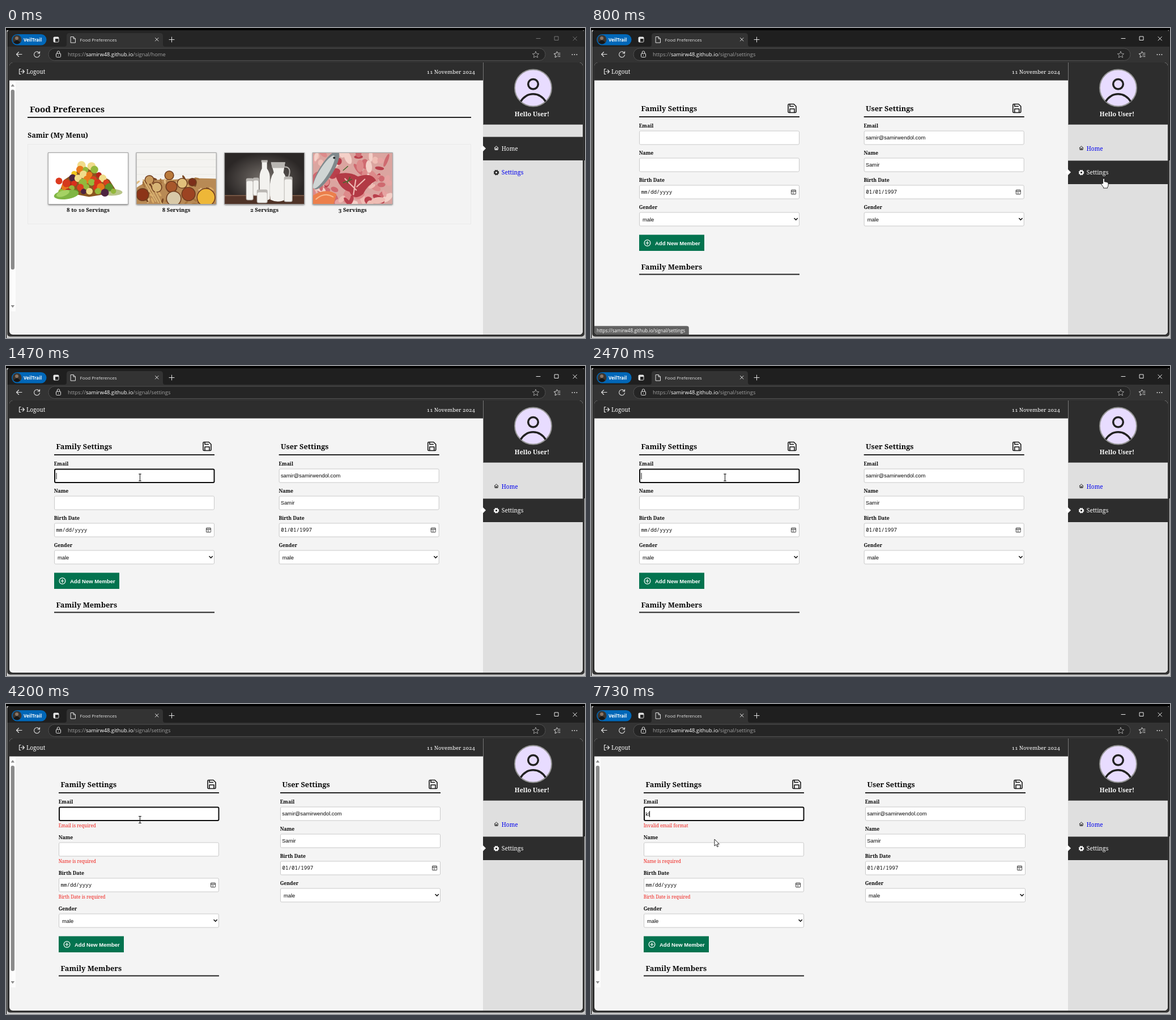
These frames come from a looping animation (1022x548 px, 8000 ms). An HTML page:

```html
<!DOCTYPE html>
<html lang="en">
<head>
<meta charset="utf-8">
<title>Food Preferences</title>
<style>
  html, body { margin: 0; width: 100%; height: 100%; overflow: hidden; background: #000; }
  svg { display: block; }
  .slab { font-family: "Noto Serif", serif; font-variant-numeric: oldstyle-nums; }
  .ui { font-family: "Open Sans", "Noto Sans", sans-serif; }
  .form { font-family: "Liberation Sans", Arial, sans-serif; font-size: 9.4px; }
  .mono { font-family: "Noto Sans Mono", "Liberation Mono", monospace; font-size: 9.15px; }
  .b { font-weight: 700; }
  .m { font-weight: 500; }
  .err { font-size: 8px; }
  .label { font-size: 8.7px; }
  .line { fill: none; stroke-linecap: round; stroke-linejoin: round; }
</style>
</head>
<body>
<svg id="stage" width="1022" height="548" viewBox="0 0 1022 548"></svg>
<script>
const LOOP = 8000, FPS = 15;
const DARK = '#2d2d2d', INK = '#080808';
const NAME = 'Samir', MAIL = 'samir@samirwendol.com', HOST = 'samirw48.github.io';

const rect = (x, y, w, h, fill, extra = '') =>
  `<rect x="${x}" y="${y}" width="${w}" height="${h}" fill="${fill}" ${extra}/>`;
const circle = (x, y, r, fill, extra = '') =>
  `<circle cx="${x}" cy="${y}" r="${r}" fill="${fill}" ${extra}/>`;
const ellipse = (x, y, rx, ry, fill, turn = 0) =>
  `<ellipse cx="${x}" cy="${y}" rx="${rx}" ry="${ry}" fill="${fill}" transform="rotate(${turn} ${x} ${y})"/>`;
const line = (d, color, width = 1, extra = '') =>
  `<path class="line" d="${d}" stroke="${color}" stroke-width="${width}" ${extra}/>`;
const shape = (d, fill, extra = '') => `<path d="${d}" fill="${fill}" ${extra}/>`;
const text = (x, y, str, cls, size, fill = INK, extra = '') =>
  `<text x="${x}" y="${y}" class="${cls}" ${size ? `font-size="${size}"` : ''} fill="${fill}" ${extra}>${str}</text>`;
const group = (id, body) => `<g id="${id}">${body}</g>`;
const at = (x, y, body) => `<g transform="translate(${x} ${y})">${body}</g>`;

function seeded(seed) {
  return () => (seed = (seed * 16807) % 2147483647) / 2147483647;
}

// ---- browser window over a light one behind it ----
function chrome() {
  const pale = '#e4e4e4';
  return rect(1, 4, 1021, 544, '#c9c9c9') + rect(1020, 4, 2, 230, '#1c1c1c') +
    rect(2, 4, 1019, 541.5, '#333', 'rx="5"') +
    shape('M2 33V9Q2 4 7 4H1016Q1021 4 1021 9V33Z', '#1f1f1f', 'id="titlebar"') +
    shape('M103 33Q107 33 107 29V14Q107 9 112 9H272Q277 9 277 14V29Q277 33 281 33Z', '#333') +
    rect(10, 11, 61.5, 19.5, '#0067b8', 'rx="9.7"') +
    circle(19.5, 20.5, 8, '#3b3530') + circle(19, 18, 3, '#8b7565') +
    shape('M13.5 25.5Q19 18 25 25.5Q19.5 31 13.5 25.5Z', '#161616') +
    text(31, 23.6, 'VeilTrail', 'ui b', 8, '#fff') +
    rect(84, 16, 9, 9, 'none', `stroke="${pale}" rx="1.5"`) + rect(84, 16, 9, 3, pale) + rect(84, 16, 3, 9, pale) +
    line('M114.5 15.5H119L122.5 19V26H114.5ZM119 15.5V19H122.5', pale) +
    text(130.5, 23.5, 'Food Preferences', 'ui', 8, pale) +
    line('M263.5 17.5L269 23M269 17.5L263.5 23', pale) +
    line('M288 20.5H297M292.5 16V25', pale) +
    group('caption', line('M936 18.5H943M968.5 15H975V21.5H968.5ZM1001 15.5L1007.5 22M1007.5 15.5L1001 22', 'currentColor')) +
    line('M28 46.5H18.5M22.5 42.5L18.5 46.5L22.5 50.5', pale, 1.1) +
    line('M59 44.5A5 5 0 1 0 59.5 47.5M59.5 41.5V44.8H56', pale, 1.1) +
    rect(75, 36, 877, 21.5, '#252525', 'rx="10.7" stroke="#505050"') +
    rect(88.5, 45, 8, 6.5, 'none', `stroke="${pale}" rx="1"`) +
    line('M90.3 45V43A2.2 2.2 0 0 1 94.7 43V45M92.5 48V48.5', pale) +
    `<text x="109" y="50.3" class="ui" font-size="9.35" fill="#a0a0a0">https://<tspan fill="#fff">${HOST}</tspan>/signal/<tspan id="page"></tspan></text>` +
    line('M935 41.5L936.7 45.2 940.7 45.6 937.7 48.3 938.6 52.2 935 50.2 931.4 52.2 932.3 48.3 929.3 45.6 933.3 45.2Z', '#aaa', .9) +
    line('M973 50L969 52 970 48 967 45.5 971 45 972.5 41.5 974 44.5H978M974 47.5H978M975 50.5H978', pale, .9) +
    [999.5, 1003.5, 1007.5].map(x => circle(x, 47, .9, pale)).join('');
}

// ---- page frame ----
const gear = (x, y, c) =>
  circle(x, y, 3.9, 'none', `stroke="${c}" stroke-width="1.8" stroke-dasharray="1.9 1.16"`) +
  circle(x, y, 2.7, 'none', `stroke="${c}" stroke-width="2"`);

const house = (x, y, c) =>
  line(`M${x - 3.3} ${y - .5}L${x} ${y - 3.6}L${x + 3.3} ${y - .5}M${x - 2.6} ${y - 1}V${y + 2.7}H${x + 2.6}V${y - 1}M${x - .8} ${y + 2.5}V${y + .3}H${x + .8}V${y + 2.5}`, c);

function nav(homeActive) {
  const y = homeActive ? 213 : 255;
  const tone = on => on ? '#fff' : '#0000ee';
  const icon = on => on ? '#fff' : '#222';
  return rect(842, y - 20.5, 176, 41.5, DARK) +
    shape(`M837.5 ${y}L842 ${y - 5}L847 ${y}L842 ${y + 5}Z`, '#fff') +
    house(865.5, 212.5, icon(homeActive)) + gear(865.5, 255.5, icon(!homeActive)) +
    text(874.8, 217, 'Home', 'slab', 10.1, tone(homeActive)) +
    text(874.8, 259, 'Settings', 'slab', 10.3, tone(!homeActive), homeActive ? 'id="link"' : '');
}

function frame() {
  return rect(6, 61, 1012, 481, '#f4f4f4') + rect(6, 61, 836, 31.6, DARK) +
    rect(842, 61, 176, 481, '#dfdfdf') + rect(842, 61, 176, 109.7, DARK) +
    rect(842, 61, 1, 109.7, '#777') +
    line('M26 72.5H23.5V81.5H26M26 77H32M29.5 74L32.3 77L29.5 80', '#eee', 1.1) +
    text(36, 80.6, 'Logout', 'slab', 10.1, '#fff') +
    text(828, 80.6, '11 November 2024', 'slab m', 9.5, '#fff', 'text-anchor="end"') +
    circle(930.5, 106, 32.5, '#e8dcff', 'stroke="#949494" stroke-width="2"') +
    circle(930.5, 99.3, 8.8, 'none', 'stroke="#222" stroke-width="3.5"') +
    line('M908.5 130A25 25 0 0 1 952.5 130', '#222', 3.5, 'style="stroke-linecap:butt"') +
    text(928.5, 155.5, 'Hello User!', 'slab b', 10.8, '#fff', 'text-anchor="middle"');
}

const scrollbar = length =>
  rect(6.5, 93, 10.5, 408, '#fcfcfc') + rect(8.5, 109, 6.5, length, '#8b8b8b', 'rx="3.2"') +
  shape('M8.5 103.5L11.8 99L15 103.5Z', '#8b8b8b') + shape('M8.5 490L11.8 494.5L15 490Z', '#8b8b8b');

// ---- home page; photos sit in 141 x 91 boxes ----
function vegetables() {
  const rnd = seeded(41);
  const tones = ['#d9301c', '#f2c51d', '#e8791c', '#5f8f2a', '#b5231a', '#d8401f', '#94b83c', '#f0dc8a', '#4d2440'];
  let out = rect(0, 0, 141, 91, '#fff') + shape('M64 24L108 48L122 70L72 78L20 68L28 48Z', '#8a5520') +
    ellipse(112, 70, 19, 6, '#b9c58a');
  for (let row = 0; row < 7; row++) {
    const n = 2 + row;
    for (let i = 0; i < n; i++) {
      const x = 68 + (i - (n - 1) / 2) * 13.5 + rnd() * 5 - 2.5;
      out += circle(x, 21 + row * 7.8 + rnd() * 3, 4.5 + rnd() * 3, tones[Math.floor(rnd() * tones.length)]);
    }
  }
  return out + ellipse(32, 74, 22, 8, '#7fb544', -8) + ellipse(26, 72, 12, 5, '#a5d264', -20) +
    circle(19, 50, 6, '#dc3a1f') + circle(32, 54, 7, '#d63a1c');
}

function grains() {
  const rnd = seeded(9);
  let out = rect(0, 0, 141, 91, '#f4f3f0');
  for (let y = 12; y < 50; y += 13) out += rect(0, y, 141, .7, '#e4e3df');
  out += shape('M0 62Q24 44 58 48Q100 44 141 46V91H0Z', '#b88a55');
  for (let i = 0; i < 70; i++)
    out += ellipse(2 + rnd() * 137, 44 + rnd() * 47, 5, 1.8, ['#e2bd83', '#a8763f', '#d9ab67', '#7a4a25'][i % 4], rnd() * 180);
  const bowls = [[11, 74, 10, '#8c3418'], [36, 61, 8, '#d7b476'], [62, 60, 9, '#a8582b'], [81, 54, 8, '#e1c07b'],
    [92, 73, 11, '#9c4322'], [66, 81, 12, '#d8c9a8'], [123, 79, 15, '#eeb738'], [58, 40, 7, '#ba7a3c'], [23, 48, 7, '#c99b5e'], [99, 52, 6, '#7c2f1a']];
  for (const [x, y, r, c] of bowls) out += circle(x, y, r + 1.6, '#6f3d1f') + circle(x, y, r, c);
  return out + line('M20 54L39 88M34 86L12 48M45 91L27 55', '#d9b473', 2);
}

function milk() {
  const white = '#f3f2ef', glass = '#b9b6b2';
  const jar = (x, y, w, h) => rect(x, y, w, h, glass, 'rx="3"') + rect(x + 1, y + 5, w - 2, h - 6, white, 'rx="3"');
  return rect(0, 0, 141, 91, 'url(#night)') + rect(0, 75, 141, 16, '#4f3327') + rect(0, 75, 141, 1.5, '#81604c') +
    shape('M66 14H75V28Q80 35 80 42V82Q71 87 62 82V42Q62 35 66 28Z', white) + rect(65, 13, 11, 4, glass) +
    shape('M82 17H107L104 35Q114 48 109 82Q95 90 81 83Q77 48 87 35Z', white) + shape('M82 17H107L105 27H84Z', glass) +
    line('M106 25Q118 25 114 40Q112 48 108 51', glass, 2) +
    jar(38, 45, 13, 39) + jar(105, 42, 15, 45) + jar(50, 44, 11, 32) + jar(57, 65, 19, 24);
}

function meat() {
  const rnd = seeded(77), tones = ['#e6a4a2', '#cf6a70', '#f4d0c8', '#dd8a8a', '#efbdb4', '#b9404c'];
  let out = rect(0, 0, 141, 91, '#dba5a0');
  for (let i = 0; i < 90; i++)
    out += ellipse(rnd() * 141, rnd() * 91, 5 + rnd() * 8, 3 + rnd() * 4, tones[i % tones.length], rnd() * 180);
  return out + shape('M40 39Q62 31 80 42Q104 34 112 49Q96 58 89 73Q73 86 65 69Q47 64 40 39Z', '#b23a45') +
    line('M57 46L77 66M76 48L72 74M92 47L78 60', '#f0bab4', 2.2) +
    ellipse(24, 31, 12, 39, '#7f898c', 32) + ellipse(20, 34, 8, 34, '#d0d5d4', 32) + circle(38, 9, 2, '#262b2c') +
    shape('M0 76Q22 61 42 73L37 91H0Z', '#ec7f4b') + line('M6 82Q21 69 36 78', '#f7bb91', 2) +
    line('M54 53L69 47M61 54L66 43M54 31L62 24', '#426b2c', 1.5);
}

function home() {
  const cards = [[vegetables, '8 to 10 Servings'], [grains, '8 Servings'], [milk, '2 Servings'], [meat, '3 Servings']];
  return scrollbar(318) +
    text(42, 148.6, 'Food Preferences', 'slab b', 15.05) + rect(38, 157, 783, 2, '#222') +
    text(38.3, 193.6, `${NAME} (My Menu)`, 'slab b', 12.2) +
    rect(38.5, 205.5, 782, 141, '#f3f3f3', 'stroke="#eaeaea"') +
    cards.map(([photo, label], i) => {
      const x = 74.5 + i * 155.6;
      return rect(x, 221, 141, 92, '#777', 'filter="url(#soft)"') +
        at(x, 220.5, `<g clip-path="url(#card)">${photo()}</g>` + rect(0, 0, 141, 91, 'none', 'stroke="#a5a5a5"')) +
        text(x + 70.5, 325.3, label, 'slab b', 9.6, INK, 'text-anchor="middle"');
    }).join('');
}

// ---- settings page ----
const floppy = (x, y) => at(x, y,
  line('M-7 -6V6Q-7 7.5 -5.5 7.5H5.5Q7 7.5 7 6V-3.5L3 -7.5H-5.5Q-7 -7.5 -7 -6ZM-4 7V1H4V7M-4 -7V-3.5H2.5', '#151515', 1.6));

const calendar = (x, y) => at(x, y,
  rect(-4, -4, 8, 8, 'none', 'stroke="#333" stroke-width=".9" rx="1"') + line('M-4 -1.6H4', '#333', 1.2) +
  line('M-2 .6H2M-2 2.3H1', '#555', .8, 'stroke-dasharray="1 1"'));

const field = (x, y) => rect(x + .5, y + .5, 282, 24, '#fff', 'stroke="#c9c9c9" rx="2"');

function form(x, title, values, pitch, errors = []) {
  const rows = ['Email', 'Name', 'Birth Date', 'Gender'];
  let out = text(x + 3.4, 147, title, 'slab b', 12.75) + floppy(x + 270, 142) + rect(x, 156, 283, 2, '#222');
  rows.forEach((row, i) => {
    const y = 181.5 + i * pitch, base = y + 16;
    out += text(x - .3, y - 6, row, 'slab b label') + field(x, y);
    if (i < 2) out += text(x + 3.2, base - .2, values[i], 'form');
    if (i === 2) out += text(x + 3.5, base - .3, values[i], 'mono') + calendar(x + 272.5, y + 12.5);
    if (i === 3) out += text(x + 6, base, values[i], 'form') +
      line(`M${x + 274} ${y + 11}l2.7 2.8l2.7 -2.8`, '#111', 1.6);
    if (errors[i]) out += text(x - .3, y + 36, errors[i], 'slab err', 0, '#f0231e', i ? '' : 'id="mailError"');
  });
  return out;
}

function settings(x, userX, pitch, errors) {
  const y = 365.5 + (pitch - 48) * 3;
  return form(x, 'Family Settings', ['', '', 'mm/dd/yyyy', 'male'], pitch, errors) +
    form(userX, 'User Settings', [MAIL, NAME, '01/01/1997', 'male'], 48) +
    rect(x, y, 115, 28.5, '#03734f') +
    circle(x + 14.5, y + 14.5, 5.4, 'none', 'stroke="#fff" stroke-width="1.2"') +
    line(`M${x + 11.8} ${y + 14.5}h5.4m-2.7 -2.7v5.4`, '#fff', 1.2) +
    text(x + 28, y + 18, 'Add New Member', 'form b', 0, '#fff', 'style="font-size:9.5px"') +
    text(x + 3.4, y + 61, 'Family Members', 'slab b', 12.75) + rect(x, y + 69, 283, 2, '#222');
}

const required = ['Email', 'Name', 'Birth Date'].map(n => n + ' is required');
const pointer = 'fill="#fff" stroke="#111" stroke-width=".9" stroke-linejoin="round"';

document.getElementById('stage').innerHTML = `<defs>
  <clipPath id="view"><rect x="6" y="61" width="1012" height="481" rx="6"/></clipPath>
  <clipPath id="card"><rect width="141" height="91"/></clipPath>
  <radialGradient id="night"><stop offset="0" stop-color="#77716c"/><stop offset="1" stop-color="#2b2726"/></radialGradient>
  <filter id="soft"><feGaussianBlur stdDeviation="1.6"/></filter></defs>` +
  chrome() +
  '<g clip-path="url(#view)">' + frame() +
  group('homeNav', nav(true)) + group('settingsNav', nav(false)) +
  group('home', home()) +
  group('plain', settings(85, 481.7, 48)) +
  group('invalid', settings(93, 484, 63, required) + scrollbar(363)) +
  group('focus', rect(1, 182.5, 281.5, 23.5, 'none', 'stroke="#0c0c0c" stroke-width="2" rx="2"') +
    text(3.2, 197.5, '', 'form', 0, INK, 'id="typed"') + rect(3.5, 189, 1, 11, '#111', 'id="caret"')) +
  group('status', shape('M6 527H169Q172.5 527 172.5 530V542H6Z', '#4a4a4a', 'stroke="#555" stroke-width=".6"') +
    text(10, 537.6, `https://${HOST}/signal/settings`, 'ui', 8.06, '#fff')) +
  '</g>' +
  group('cursor',
    group('arrow', shape('M0 0V12L2.8 9.4L4.8 13.6L6.6 12.8L4.7 8.7H8.4Z', '#fff', pointer)) +
    group('hand', shape('M-1.4 9V1.3A1.4 1.4 0 0 1 1.4 1.3V6Q3 5 4 6.4Q5.6 5.6 6.3 7Q8 6.6 8 8.5V12Q8 14 6.6 15.5V17H-.5V15.5Q-2 13.5 -4 10.5Q-4.4 8.8 -2.9 8.8Z', '#fff', pointer)) +
    group('beam', line('M-2 -6H2M0 -6V6M-2 6H2', '#111')));

// ---- motion, counted in ticks of 1/15 s ----
const PATH = [
  [2, 1000, 470, 'arrow'], [5, 950, 360, 'arrow'], [8, 915, 285, 'arrow'], [9, 908, 270, 'hand'],
  [10, 905, 266, 'hand'], [12, 905, 266, 'hand'], [13, 868, 258, 'arrow'], [14, 806, 236, 'arrow'],
  [15, 715, 190, 'arrow'], [16, 600, 155, 'arrow'], [17, 455, 141, 'arrow'], [18, 320, 160, 'arrow'],
  [19, 236.5, 197, 'beam'], [39, 236.5, 197, 'beam'], [41, 257, 184, 'beam'], [42, 258, 215, 'arrow'],
  [44, 215, 325, 'arrow'], [46, 165.5, 374, 'hand'], [52, 165.5, 374, 'arrow'], [56, 165.5, 374, 'arrow'],
  [59, 95, 290, 'arrow'], [61, 200, 225, 'arrow'], [62, 282, 205, 'beam'], [63, 236.5, 204.5, 'beam'],
  [65, 218, 239, 'arrow']];
const NAVIGATE = 12, FOCUS = 21, BLUR = 50, SUBMIT = 51, TYPE = 115, BLINK = 8;

const el = {};
document.querySelectorAll('[id]').forEach(node => el[node.id] = node);
const show = (id, on) => el[id].style.display = on ? '' : 'none';
const clamp = v => Math.max(0, Math.min(1, v));

function pose(n) {
  const i = PATH.findLastIndex(p => p[0] <= n);
  if (i < 0) return null;
  const a = PATH[i], b = PATH[i + 1] || a;
  const k = b === a ? 0 : (n - a[0]) / (b[0] - a[0]);
  return { x: a[1] + (b[1] - a[1]) * k, y: a[2] + (b[2] - a[2]) * k, kind: a[3] };
}

function render(ms) {
  const n = Math.floor((ms + 4) * FPS / 1000);
  const onHome = n < NAVIGATE, failed = n >= SUBMIT;
  const active = n >= 2;
  el.titlebar.setAttribute('fill', active ? '#1f1f1f' : '#252525');
  el.caption.style.color = active ? '#eee' : '#777';
  el.page.textContent = onHome ? 'home' : 'settings';
  show('home', onHome);
  show('homeNav', onHome);
  show('settingsNav', !onHome);
  show('plain', !onHome && !failed);
  show('invalid', failed);
  el.link.setAttribute('fill', n >= 9 ? '#ff1f0f' : '#0000ee');
  el.status.style.opacity = n < 20 ? clamp((n - 9) / 3.5) : clamp((22 - n) / 3);

  const typed = 'kl'.slice(0, Math.max(0, n - TYPE + 1));
  const since = failed ? n - SUBMIT : n - FOCUS;
  show('focus', failed || n >= FOCUS && n < BLUR);
  el.focus.setAttribute('transform', `translate(${failed ? 93 : 85} 0)`);
  el.typed.textContent = typed;
  el.caret.setAttribute('x', 3.5 + [0, 4.5, 6.5][typed.length]);
  show('caret', Math.floor(since / BLINK) % 2 === 0);
  el.mailError.textContent = typed ? 'Invalid email format' : required[0];

  const p = pose(n);
  show('cursor', p);
  if (p) {
    el.cursor.setAttribute('transform', `translate(${p.x} ${p.y})`);
    ['arrow', 'hand', 'beam'].forEach(kind => show(kind, kind === p.kind));
  }
}

const start = performance.now();
function loop() {
  render((performance.now() - start) % LOOP);
  requestAnimationFrame(loop);
}
loop();
</script>
</body>
</html>
```
